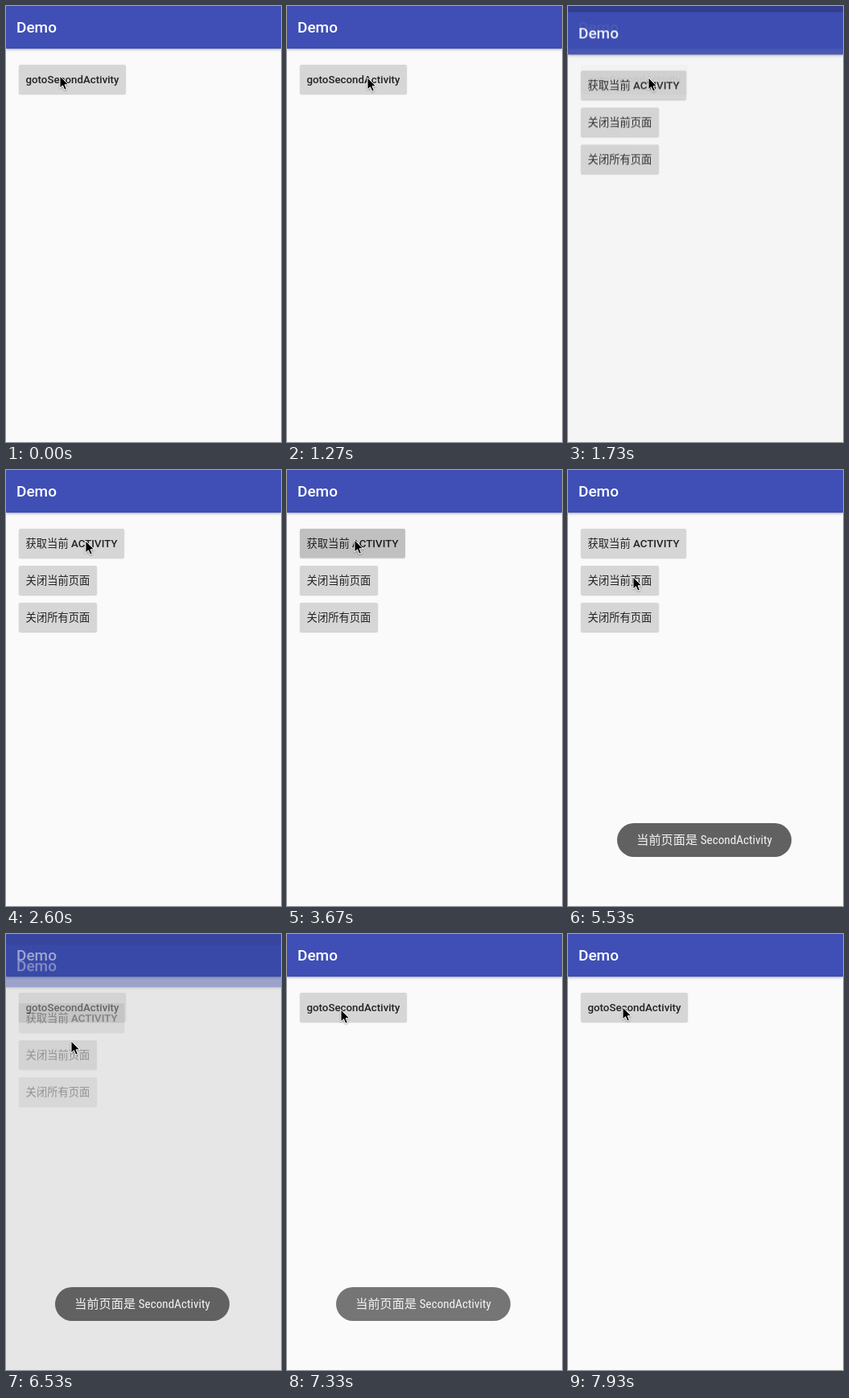
These frames come from a looping animation (342 by 542 pixels, 8 s). An HTML page:

```html
<!DOCTYPE html>
<html lang="zh">
<head>
<meta charset="utf-8">
<title>Activity demo</title>
<style>
  html, body { margin: 0; width: 100%; height: 100%; overflow: hidden; }
  #stage {
    position: relative; width: 342px; height: 542px; overflow: hidden; background: #000;
    font-family: Roboto, "Noto Sans CJK SC", "Noto Sans CJK", sans-serif;
  }
  .page { position: absolute; inset: 0; background: #fafafa; }
  #second { opacity: 0; }
  header {
    height: 53px; padding-left: 13px; color: #fff; background: #3f4fb5;
    font-size: 19px; font-weight: 500; line-height: 54px;
    box-shadow: 0 1px 3px rgba(0, 0, 0, .35);
  }
  .button {
    position: absolute; left: 16px; height: 36px; overflow: hidden;
    border-radius: 2px; background: #d6d6d6; color: #222;
    box-shadow: 0 1px 1.5px rgba(0, 0, 0, .2);
    font-size: 13.3px; font-weight: 500; line-height: 37px;
    text-align: center; white-space: nowrap;
  }
  .button span { font-weight: 400; }
  .button i { position: absolute; inset: 0; background: #000; opacity: 0; }
  #toast {
    position: absolute; left: 61px; top: 439px; width: 217px; height: 42px;
    border-radius: 21px; background: #616161; color: #f4f4f4; opacity: 0;
    font-family: "Roboto Condensed", Roboto, "Noto Sans CJK SC", "Noto Sans CJK", sans-serif;
    font-size: 15.2px; font-stretch: 75%; line-height: 43px;
    text-align: center; white-space: nowrap;
  }
  #cursor {
    position: absolute; left: -1px; top: -1px; width: 14px; height: 21px; overflow: visible;
    filter: drop-shadow(0 1px 1px rgba(0, 0, 0, .3));
  }
</style>
</head>
<body>
<div id="stage">
  <div class="page" id="first">
    <header>Demo</header>
    <div class="button" id="open" style="top:73px;width:133px">gotoSecondActivity<i></i></div>
  </div>
  <div class="page" id="second">
    <header>Demo</header>
    <div class="button" id="current" style="top:73px;width:131px"><span>获取当前</span> ACTIVITY<i></i></div>
    <div class="button" id="close" style="top:119px;width:97px"><span>关闭当前页面</span><i></i></div>
    <div class="button" style="top:165px;width:97px"><span>关闭所有页面</span></div>
  </div>
  <div id="toast">当前页面是 SecondActivity</div>
  <svg id="cursor" viewBox="0 0 14 21">
    <path d="M1 1V16L4.5 12.8L6.8 18.2L9.4 17.1L7.1 11.8H11.8Z"
          fill="#000" stroke="#fff" stroke-width="1" stroke-linejoin="round"/>
  </svg>
</div>
<script>
  const LOOP = 8000;
  const QUINT_OUT = 'cubic-bezier(.23,1,.32,1)';
  const QUART_OUT = 'cubic-bezier(.165,.84,.44,1)';
  const QUART_IN = 'cubic-bezier(.895,.03,.685,.22)';
  const QUAD_OUT = 'cubic-bezier(.333,.667,.667,1)';
  const QUAD_IN = 'cubic-bezier(.333,0,.667,.333)';
  const SLIDE = 43;

  // Each step is [ms, value, easing towards the next step].
  function track(selector, property, steps, format = v => v) {
    const all = [[0, steps[0][1]], ...steps, [LOOP, steps[steps.length - 1][1]]];
    const frames = all.map(([time, value, easing = 'linear']) =>
      ({ offset: time / LOOP, [property]: format(value), easing }));
    document.querySelector(selector)
      .animate(frames, { duration: LOOP, iterations: Infinity });
  }

  const move = ([x, y]) => `translate(${x}px, ${y}px)`;
  const press = (id, start) => track(`#${id} i`, 'opacity',
    [[start, 0], [start + 130, .1], [start + 400, .1], [start + 750, 0]]);

  track('#first', 'opacity',
    [[1630, 1, QUAD_OUT], [1850, .7], [6340, .7, QUAD_IN], [6590, 1]]);
  track('#second', 'opacity',
    [[1630, 0, QUART_OUT], [1830, 1], [6440, 1], [6590, 0]]);
  track('#second', 'transform',
    [[1630, [0, SLIDE], QUINT_OUT], [1980, [0, 0]], [6340, [0, 0], QUART_IN], [6590, [0, SLIDE]]], move);
  track('#toast', 'opacity',
    [[3775, 0, QUAD_OUT], [4275, 1], [7150, 1, QUAD_IN], [7650, 0]]);

  press('open', 1270);
  press('current', 3470);
  press('close', 6000);

  track('#cursor', 'transform', [
    [330, [67, 87], 'ease-in-out'], [1070, [100, 89]],
    [2530, [100, 89]], [2600, [99, 88]], [2730, [84, 87]],
    [4930, [84, 87], 'ease-in-out'], [5530, [81, 133]],
    [6870, [81, 133], 'ease-in-out'], [7270, [67, 94]],
    [7730, [67, 94]], [7930, [68, 91]]
  ], move);
</script>
</body>
</html>
```
